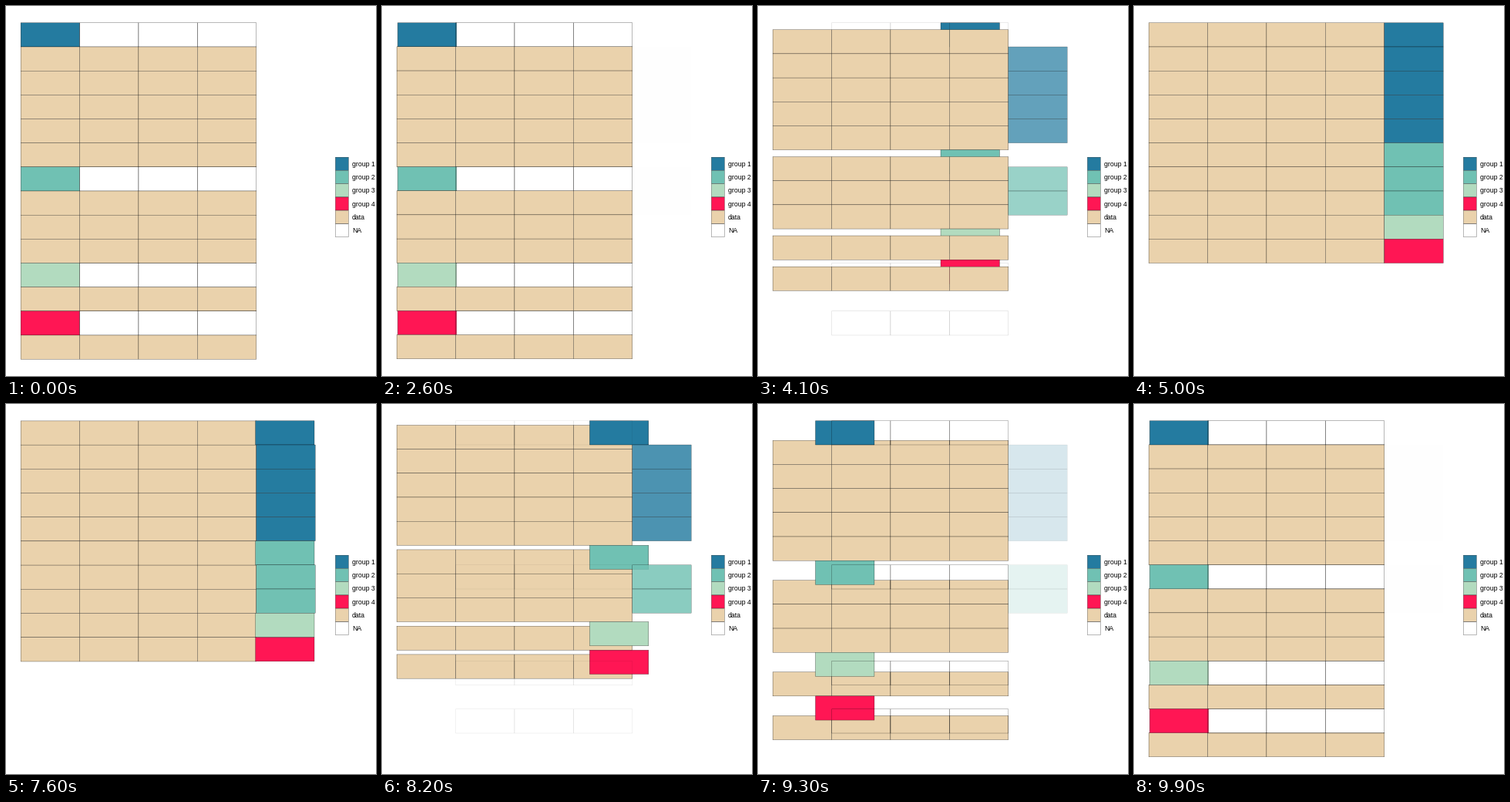
A matplotlib script that plays this animation: 480 px wide and 480 px high, repeating every 10 s.

```python
import math

import matplotlib.pyplot as plt
from matplotlib.animation import FuncAnimation
from matplotlib.collections import PolyCollection
from matplotlib.colors import to_rgba

SIZE, DPI = 480, 72
FRAMES, INTERVAL = 100, 100
HALF, REST = 50, 25
LINE = 0.28

PANEL_W = 420.3
COL_W, ROW_H = PANEL_W / 5.5, SIZE / 15.4
LEFT, TOP = COL_W * 0.25, ROW_H * 0.7

COLORS = {
    "group 1": "#247BA0",
    "group 2": "#70C1B3",
    "group 3": "#B2DBBF",
    "group 4": "#FF1654",
    "data": "#EAD2AC",
    "NA": None,
}
GROUP_ROWS = [5, 3, 1, 1]


def rect(x, y, w, h):
    return [(x, y), (x + w, y), (x + w, y + h), (x, y + h)]


def face(kind, alpha=1):
    color = COLORS[kind]
    return to_rgba(color, alpha) if color else (1, 1, 1, 0)


def build_tiles():
    """Tiles as (kind, long cell, wide cell); a missing cell is None."""
    long, wide = [], []
    row_a = row_b = 0
    for g, count in enumerate(GROUP_ROWS):
        kind = f"group {g + 1}"
        head = (kind, (0, row_a), (4, row_b))
        long.append(head)
        long += [("NA", (c, row_a), None) for c in range(1, 4)]
        for i in range(count):
            cells = [("data", (c, row_a + 1 + i), (c, row_b + i)) for c in range(4)]
            long += cells
            wide += cells
            wide.append(head if i == 0 else (kind, None, (4, row_b + i)))
        row_a += count + 1
        row_b += count
    return long, wide


LONG, WIDE = build_tiles()
# New tiles are stacked above those that were already there.
TO_WIDE = LONG + [t for t in WIDE if t[1] is None]
TO_LONG = WIDE + [t for t in LONG if t[2] is None]


def ease(t):
    return (1 - math.cos(math.pi * t)) / 2


def scene(frame):
    """Return the stacking order and how far the table is towards wide."""
    half, k = divmod(frame, HALF)
    if k <= REST:
        return (WIDE, 1) if half else (LONG, 0)
    s = ease((k - REST) / REST)
    return (TO_LONG, 1 - s) if half else (TO_WIDE, s)


def place(tile, s):
    kind, a, b = tile
    alpha = 1
    if a is None:
        a, alpha = b, s
    elif b is None:
        b, alpha = a, 1 - s
    col, row = (p + (q - p) * s for p, q in zip(a, b))
    box = rect(LEFT + col * COL_W, TOP + row * ROW_H, COL_W, ROW_H)
    return box, face(kind, alpha), (0, 0, 0, alpha)


fig = plt.figure(figsize=(SIZE / DPI, SIZE / DPI), dpi=DPI, facecolor="white")
ax = fig.add_axes([0, 0, 1, 1])
ax.set_xlim(0, SIZE)
ax.set_ylim(SIZE, 0)
ax.axis("off")


def add_boxes(boxes, **style):
    boxes = PolyCollection(boxes, linewidths=LINE, joinstyle="miter", **style)
    boxes.set_snap(False)
    ax.add_collection(boxes, autolim=False)
    return boxes


def add_legend(x=427.2, y=196.0, key=17.28, inset=0.15):
    side = key - 2 * inset
    boxes = [rect(x + inset, y + i * key + inset, side, side) for i in range(len(COLORS))]
    add_boxes(boxes, facecolors=[face(k) for k in COLORS], edgecolors="black")
    for i, label in enumerate(COLORS):
        ax.text(x + key + 4.6, y + (i + 0.5) * key + 3.15, label,
                family="Liberation Sans", size=8.8, color="black", va="baseline")


add_legend()
table = add_boxes([])


def update(frame):
    order, s = scene(frame)
    boxes, fills, edges = zip(*(place(t, s) for t in order))
    table.set_verts(boxes)
    table.set_facecolor(fills)
    table.set_edgecolor(edges)
    return (table,)


anim = FuncAnimation(fig, update, frames=FRAMES, interval=INTERVAL,
                     init_func=lambda: update(0), repeat=True, repeat_delay=0)
plt.show()
```
